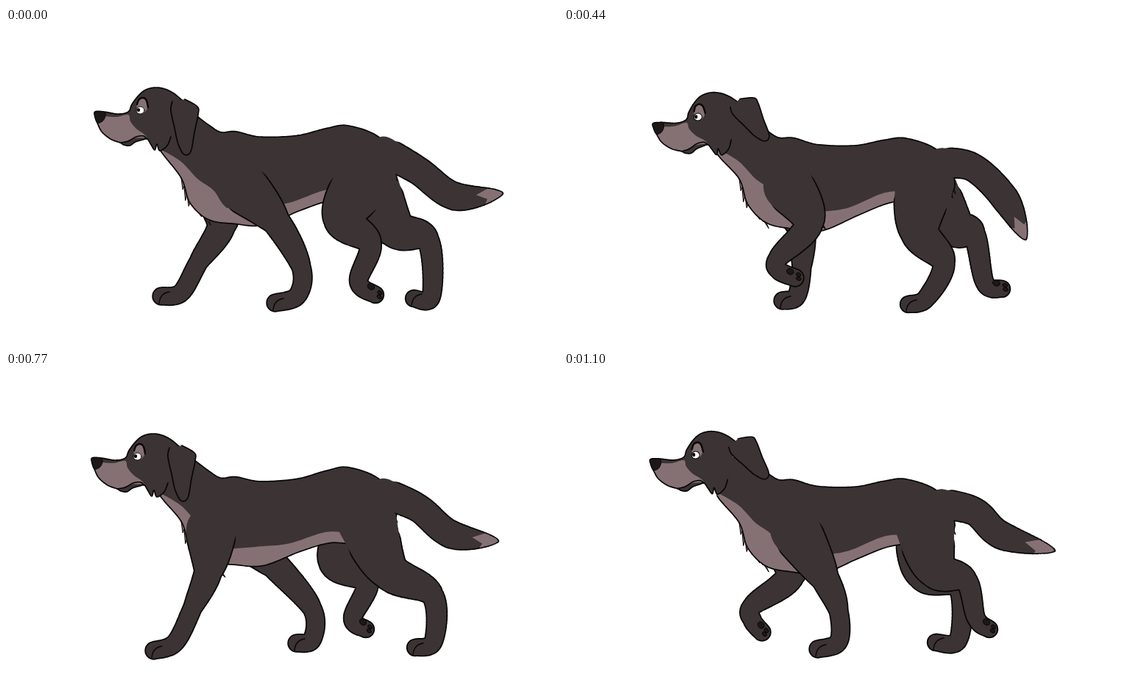
An HTML page with a canvas that plays this animation: 750x430 px, repeating every 1210 ms.

```html
<!DOCTYPE html>
<html lang="en">
<head>
<meta charset="utf-8">
<title>Walking dog</title>
<style>
  html, body { margin: 0; width: 100%; height: 100%; overflow: hidden; background: #fff; }
  canvas { display: block; }
</style>
</head>
<body>
<canvas id="stage" width="750" height="430"></canvas>
<script>
const ctx = document.getElementById('stage').getContext('2d');
const COAT = '#3b3334', LIGHT = '#857174', DARK = '#1e1718', INK = '#080606';
const STEP = 110, STEPS = 11, FINE = 16, LINE = 1.7;

const points = s => s.split(' ').map(p => p.split(',').map(Number));
const mix = (a, b, t) => a.map((v, i) => v + (b[i] - v) * t);
const add = ([x, y], dx, dy) => [x + dx, y + dy];
const clamp = v => Math.max(0, Math.min(1, v));

// Resting shapes
const BODY = points('250,112 275,131 292,141 312,140 345,147 395,145 435,135 465,131 507,147 529,182 524,208 480,232 440,232 400,243 350,262 310,261 275,257 250,236 238,203 208,163 205,140 225,110');
const UNDER = 11, THROAT = 19;
const CHEST = points('212,166 238,182 260,205 282,221 300,245 345,275');
const BELLY = points('300,240 345,236 385,232 435,217 470,220');
const HEAD = points('224,148 219,160 209,167 205,158 202,166 196,157 192,151 186,152 176,155 168,160 160,159 155,156 142,151 130,141 124,129 121,121 121,114 133,114 152,117 166,114 171,104 180,92 190,84 203,81 216,83 228,89 239,98');
const MUZZLE = points('134,120 150,121 166,118 169,127 177,137 187,144 190,149 174,150 155,156 142,151 130,141 124,129');
const MOUTH = points('155,156 166,154 177,148 187,147 191,151');
const NOSE = points('121,114 133,114 135,120 131,127 124,129 121,122');
const BROW = points('178,104 181,97 187,95 191,99 193,108');
const EAR = points('226,100 224,112 229,136 234,158 242,172 251,168 256,142 261,118 260,107 243,97');

// Key poses. Head: eye x, eye y, tilt, ear swing. Tail: two bends and the tip.
// Front legs: elbow, wrist, heel, toe. Hind legs: knee, hock, heel, toe.
const keys = [];
function key(step, ...parts) {
  const [head, tail, nearFront, farFront, nearHind, farHind] = parts.map(points);
  keys.push({ step, parts: { head, tail, nearFront, farFront, nearHind, farHind } });
}
key(0, '183,108,0,0', '560,194 610,229 674,225',
  '366,262 401,325 396,364 366,374', '293,268 262,318 238,360 211,365',
  '457,258 495,293 479,345 502,363', '528,272 573,288 578,365 554,368');
key(2, '182,111,.1,-.05', '553,178 592,217 658,247',
  '355,265 352,325 362,348 380,361', '301,270 298,325 288,362 262,367',
  '468,273 476,314 452,364 421,373', '532,265 576,285 600,362 584,367');
key(4, '182,117,-.11,-.55', '556,190 599,232 627,287',
  '333,265 291,313 292,330 314,340', '322,270 323,325 316,365 297,371',
  '482,275 516,319 492,368 468,376', '530,270 557,280 572,347 595,355');
key(5, '180,108,-.11,-.6', '560,186 605,227 670,243',
  '314,267 262,313 262,330 281,345', '337,272 356,322 354,364 330,370',
  '501,268 543,308 528,366 503,374', '533,262 550,280 560,337 572,345');
key(7, '179,111,0,0', '560,185 605,221 668,230',
  '275,270 254,320 230,368 201,379', '365,262 416,322 416,364 395,369',
  '520,270 579,303 581,366 556,375', '450,255 491,285 471,335 489,350');
key(9, '182,117,-.08,-.45', '557,198 607,233 675,237',
  '327,270 330,325 326,368 300,376', '312,275 287,322 290,342 305,352',
  '520,262 558,272 576,340 604,344', '472,268 508,296 492,364 460,370');
key(10, '179,109,-.06,-.6', '558,190 594,222 666,243',
  '354,280 373,325 373,367 345,377', '308,276 256,318 256,338 269,354',
  '505,268 546,283 560,335 578,350', '490,272 537,292 536,364 505,368');

// The trunk dips twice per loop.
const dip = (step, mid, size, low) =>
  mid - size * Math.cos(4 * Math.PI * (step - low) / STEPS);

// Points of a smooth curve through all of p.
function smooth(p) {
  const out = [p[0]], last = p.length - 1;
  for (let i = 0; i < last; i++) {
    const a = p[Math.max(0, i - 1)], b = p[i], c = p[i + 1], d = p[Math.min(last, i + 2)];
    for (let k = 1; k <= FINE; k++) {
      const t = k / FINE;
      out.push([0, 1].map(j => b[j] + .5 * t * (c[j] - a[j]
        + t * (2 * a[j] - 5 * b[j] + 4 * c[j] - d[j] + t * (3 * (b[j] - c[j]) + d[j] - a[j])))));
    }
  }
  return out;
}

function trace(pts) {
  const path = new Path2D();
  pts.forEach(p => path.lineTo(...p));
  return path;
}

function paint(path, fill, width = LINE) {
  if (fill) { ctx.fillStyle = fill; ctx.fill(path); }
  if (width) { ctx.lineWidth = width; ctx.stroke(path); }
}
const curve = p => trace(smooth(p));

function oval(x, y, rx, ry, turn, fill, width = 0) {
  const path = new Path2D();
  path.ellipse(x, y, rx, ry, turn, 0, 7);
  paint(path, fill, width);
}

function inside(clip, draw) {
  ctx.save();
  ctx.clip(clip);
  draw();
  ctx.restore();
}

// A tapering limb made of discs; its outline begins after `bare` of them.
function limb(joints, radii, bare) {
  const all = new Path2D(), edged = new Path2D();
  smooth(joints).forEach(([x, y], n) => {
    const i = Math.min(Math.floor(n / FINE), radii.length - 2);
    const r = radii[i] + (radii[i + 1] - radii[i]) * (n / FINE - i) ** 1.5;
    for (const path of n < bare ? [all] : [all, edged]) {
      path.moveTo(x + r, y);
      path.arc(x, y, r, 0, 7);
    }
  });
  paint(edged, null, 2 * LINE);
  paint(all, COAT, 0);
  return all;
}

// Hair tips between a and b; the limb or body drawn next hides their roots.
function fur(a, b, n, dx, dy, fill = COAT) {
  for (let k = 0; k < n; k++) {
    const long = 1 + k % 2 * .5;
    paint(trace([mix(a, b, k / n), add(mix(a, b, (k + .8) / n), dx * long, dy * long), mix(a, b, (k + 1) / n)]), fill, 1);
  }
}

// Raised paws point backwards and show their pads.
function paw(heel, toe) {
  const dx = toe[0] - heel[0], dy = toe[1] - heel[1], d = Math.hypot(dx, dy) || 1;
  if (dx > 0) {
    const turn = Math.atan2(dy, dx), pad = (along, up, rx, ry) =>
      oval(...add(mix(heel, toe, along), dy / d * up, -dx / d * up), rx, ry, turn, DARK, 1);
    pad(.6, 5, 5, 4);
    pad(1.1, 6, 3.5, 2.5);
    pad(1.2, 1, 3.5, 2.5);
  } else {
    const line = new Path2D();
    line.moveTo(...add(toe, -3, 10));
    line.quadraticCurveTo(...add(toe, -2, -4), ...add(toe, 11, -6));
    paint(line, null, 1.4);
  }
}

function frontLeg(joints, near) {
  const [elbow, , heel, toe] = joints;
  const shoulder = [308 + .45 * (elbow[0] - 340), 215];
  if (near) fur(add(elbow, 14, -14), add(elbow, 14, 2), 2, 6, 6);
  limb([shoulder, ...joints], [34, 18, 12, 11.5, 11], 4);
  paw(heel, toe);
}

function hindLeg(joints, hip) {
  limb([[490, 203 + .4 * hip], ...joints], [40, 25, 14, 11.5, 10.5], 8);
  paw(joints[2], joints[3]);
}

function drawTail(bends, hip) {
  const root = [513, 166 + hip * .9], [a, b, tip] = bends;
  fur(add(a, -10, 13), add(b, -8, 15), 7, 5, 4);
  const shape = limb([root, ...bends], [20, 18, 18, .5], 6);
  const end = mix(b, tip, .5), dx = tip[0] - b[0], dy = tip[1] - b[1];
  const across = (along, side) => add(end, dx * along - dy * side, dy * along + dx * side);
  inside(shape, () => paint(trace([across(0, -.5), across(.2, -.12), across(-.05, 0),
    across(.18, .1), across(0, .5), across(.8, .5), across(.8, -.5)]), LIGHT, 0));
}

function drawTrunk(withers, hip, belly) {
  const sag = ([x, y]) => [x, y + belly * Math.sin(Math.PI * clamp((x - 225) / 255))];
  const pts = BODY.map((p, i) => i >= UNDER && i < THROAT ? sag(p)
    : add(p, 0, withers + (hip - withers) * clamp((p[0] - 290) / 170)));
  const edge = smooth(pts), body = trace(edge);
  fur(pts[17], pts[16], 4, 3, 6, LIGHT);
  fur(pts[18], pts[17], 3, -1, 7, LIGHT);
  fur(pts[9], pts[10], 3, 4, 6);
  paint(body, COAT, 0);
  inside(body, () => {
    paint(trace([...smooth(CHEST), [345, 300], [190, 300], [190, 166]]), LIGHT, 0);
    paint(trace([...smooth(BELLY.map(sag)), [470, 300], [300, 300]]), LIGHT, 0);
  });
  paint(trace(edge.slice(0, THROAT * FINE + 1)));
}

function drawHead([x, y, tilt, swing]) {
  ctx.save();
  ctx.translate(x, y);
  ctx.rotate(tilt);
  ctx.translate(-183, -108);
  const head = curve(HEAD);
  paint(head, COAT, 0);
  paint(curve(MUZZLE), LIGHT, 0);
  paint(head);
  paint(curve(MOUTH), null, 1.6);
  paint(curve(NOSE), DARK, 1);
  oval(185, 106, 7.5, 10, .1, LIGHT);
  oval(182.5, 112, 5.5, 5, 0, '#fff', 1);
  oval(180, 111.5, 2.2, 2.6, 0, INK);
  paint(curve(BROW), null, 2.4);
  ctx.translate(235, 98);
  ctx.rotate(swing - tilt);
  ctx.scale(1, 1 + .2 * swing);
  ctx.translate(-235, -98);
  paint(curve(EAR), COAT);
  ctx.restore();
}

function poseAt(step) {
  const i = keys.findLastIndex(k => k.step <= step);
  const a = keys[i], b = keys[i + 1] || a;
  const t = (step - a.step) / (b.step - a.step || 1);
  const pose = {};
  for (const name in a.parts) pose[name] = a.parts[name].map((p, n) => mix(p, b.parts[name][n], t));
  return pose;
}

function draw(step) {
  const pose = poseAt(step);
  const withers = dip(step, 5, 5, .45), hip = dip(step, 8, 12, .9), belly = dip(step, 7.5, 6.5, 1.2);
  ctx.fillStyle = '#fff';
  ctx.fillRect(0, 0, 750, 430);
  ctx.strokeStyle = INK;
  ctx.lineJoin = ctx.lineCap = 'round';
  hindLeg(pose.farHind, hip);
  frontLeg(pose.farFront, false);
  drawTrunk(withers, hip, belly);
  drawTail(pose.tail, hip);
  hindLeg(pose.nearHind, hip);
  frontLeg(pose.nearFront, true);
  drawHead(pose.head[0]);
}

const start = performance.now();
function tick() {
  draw(Math.floor((performance.now() - start) / STEP) % STEPS);
  requestAnimationFrame(tick);
}
tick();
</script>
</body>
</html>
```
